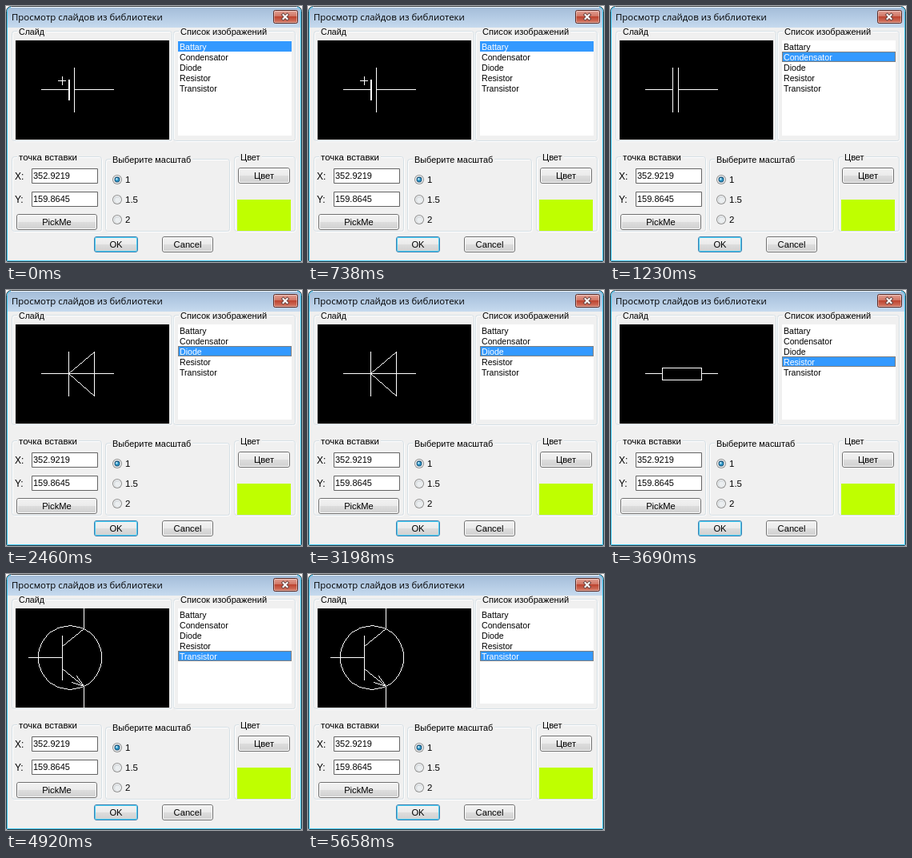
These frames come from a looping animation (370x320 px, 6.15 s). An HTML page with a canvas:

```html
<!DOCTYPE html>
<html lang="ru">
<head>
<meta charset="utf-8">
<style>
html, body { margin: 0; width: 370px; height: 320px; overflow: hidden; background: #fff; }
canvas { display: block; }
</style>
</head>
<body>
<canvas id="stage" width="370" height="320"></canvas>
<script>
const ctx = document.getElementById('stage').getContext('2d');
const SANS = '"Liberation Sans", Arial, sans-serif';
const STEP = 1230;
const items = ['Battary', 'Condensator', 'Diode', 'Resistor', 'Transistor'];

function rect(x, y, w, h, color) {
  ctx.fillStyle = color;
  ctx.fillRect(x, y, w, h);
}

function round(x, y, w, h, r, stroke, fill) {
  ctx.beginPath();
  ctx.roundRect(x + .5, y + .5, w - 1, h - 1, r);
  if (fill) { ctx.fillStyle = fill; ctx.fill(); }
  ctx.lineWidth = 1;
  ctx.strokeStyle = stroke;
  ctx.stroke();
}

function text(str, x, y, size = 11, color = '#000', font = SANS, align = 'left') {
  ctx.font = `${size}px ${font}`;
  ctx.textAlign = align;
  ctx.fillStyle = color;
  ctx.fillText(str, x, y);
}

function shade(y, h, ...stops) {
  const g = ctx.createLinearGradient(0, y, 0, y + h);
  stops.forEach(([at, color]) => g.addColorStop(at, color));
  return g;
}

function group(x, y, w, h, label, tx, size) {
  round(x + 1, y + 1, w, h, 3, '#fff');
  round(x, y, w, h, 3, '#d5dfe5');
  ctx.font = `${size}px ${SANS}`;
  rect(tx - 2, y - 2, ctx.measureText(label).width + 4, 5, '#f0f0f0');
  text(label, tx, y + 5, size);
}

function button(x, y, w, h, label, active) {
  round(x, y, w, h, 2.5, active ? '#3c7fb1' : '#707070',
    shade(y, h, [0, '#f3f3f3'], [.48, '#ebebeb'], [.5, '#dddddd'], [1, '#cfcfcf']));
  round(x + 1, y + 1, w - 2, h - 2, 1.5, active ? '#48d0f5' : '#fafafa');
  text(label, x + w / 2, y + 14, 11.2, '#000', SANS, 'center');
}

function field(y, label, value) {
  text(label, 11, y + 14, 12);
  round(32, y, 83, 19, 0, '#646464', '#fff');
  text(value, 34, y + 13, 11);
}

function disc(x, y, r, color) {
  ctx.fillStyle = color;
  ctx.beginPath();
  ctx.arc(x, y, r, 0, Math.PI * 2);
  ctx.fill();
}

function radio(y, label, on) {
  disc(139, y, 6, '#8e8f8f');
  disc(139, y, 5, '#f6f6f6');
  disc(139, y, 4, '#d3d8dc');
  disc(139.5, y + .5, 3.3, '#ebeef0');
  if (on) {
    disc(139, y, 3.4, '#17486b');
    disc(139, y, 2.6, '#2c93c4');
    disc(138.3, y - .8, 1.2, '#b5e6f7');
  }
  text(label, 149, y + 4, 11.5);
}

function titleBar() {
  round(0, 0, 370, 320, [6, 6, 1, 1], '#3a3f44', '#b9d1ea');
  round(1, 1, 368, 318, [5, 5, 0, 0], '#35c3ee',
    shade(1, 26, [0, '#a3bcd8'], [.5, '#b4cbe4'], [1, '#c6daee']));
  rect(6, 1, 358, 1, '#f4f9fd');
  rect(2, 27, 366, 291, '#f0f0f0');
  text('Просмотр слайдов из библиотеки', 7, 18, 11.45, '#000', '"Open Sans", "Noto Sans", sans-serif');
  round(334, 5, 31, 17, 2, '#5b2a25',
    shade(5, 17, [0, '#e5a79b'], [.46, '#d07564'], [.5, '#bd4430'], [1, '#d6806c']));
  round(335, 6, 29, 15, 1, 'rgba(255,255,255,.4)');
  ctx.lineCap = 'square';
  for (const [w, color] of [[4, '#6d4540'], [2, '#fff']]) {
    ctx.lineWidth = w;
    ctx.strokeStyle = color;
    ctx.beginPath();
    ctx.moveTo(346.5, 11); ctx.lineTo(351.5, 16);
    ctx.moveTo(351.5, 11); ctx.lineTo(346.5, 16);
    ctx.stroke();
  }
  ctx.lineCap = 'butt';
}

// Crisp one-pixel polyline
function line(...p) {
  ctx.fillStyle = '#fff';
  for (let i = 0; i + 3 < p.length; i += 2) {
    const dx = p[i + 2] - p[i], dy = p[i + 3] - p[i + 1];
    const n = Math.max(Math.abs(dx), Math.abs(dy), 1);
    for (let k = 0; k <= n; k++)
      ctx.fillRect(Math.round(p[i] + dx * k / n), Math.round(p[i + 1] + dy * k / n), 1, 1);
  }
}

function ring(cx, cy, r) {
  const p = [];
  for (let i = 0; i <= 48; i++) {
    const a = i * Math.PI / 24;
    p.push(Math.round(cx + r * Math.cos(a)), Math.round(cy + r * Math.sin(a)));
  }
  line(...p);
}

const symbols = [
  () => {
    line(44, 104, 78, 104);
    rect(78, 92, 2, 26, '#fff');
    line(85, 77, 85, 132);
    line(85, 104, 134, 104);
    line(65, 93, 74, 93);
    line(70, 88, 70, 98);
  },
  () => {
    line(44, 104, 78, 104);
    line(78, 77, 78, 132);
    line(85, 77, 85, 132);
    line(85, 104, 134, 104);
  },
  () => {
    line(44, 104, 134, 104);
    line(78, 77, 78, 132);
    line(78, 104, 110, 77, 110, 132, 78, 104);
  },
  () => {
    line(44, 104, 65, 104);
    line(65, 97, 114, 97, 114, 112, 65, 112, 65, 97);
    line(114, 104, 134, 104);
  },
  () => {
    ring(79.6, 104, 39.8);
    line(28, 104, 70, 104);
    line(70, 77, 70, 132);
    line(70, 90, 97, 68, 97, 43);
    line(70, 118, 97, 140, 97, 166);
    line(82, 135, 97, 140, 88, 127);
  }
];

function dotted(x, y, w, h, color) {
  ctx.lineWidth = 1;
  ctx.strokeStyle = color;
  ctx.setLineDash([1, 1]);
  ctx.strokeRect(x + .5, y + .5, w - 1, h - 1);
  ctx.setLineDash([]);
}

function list(sel) {
  rect(215, 43, 142, 119, '#fff');
  const top = 44 + sel * 13;
  rect(215, top, 142, 13, '#3399ff');
  if (sel) dotted(215, top, 142, 13, '#cc6600');
  items.forEach((name, i) =>
    text(name, 217, 55 + i * 13, 10.6, i === sel ? '#fff' : '#000'));
}

function draw(sel) {
  ctx.clearRect(0, 0, 370, 320);
  titleBar();
  group(7, 31, 201, 138, 'Слайд', 16, 10.6);
  group(209, 31, 153, 138, 'Список изображений', 218, 11.1);
  group(7, 188, 113, 94, 'точка вставки', 16, 11.5);
  group(124, 191, 156, 91, 'Выберите масштаб', 133, 10.9);
  group(285, 188, 77, 94, 'Цвет', 293, 11);

  rect(12, 43, 192, 124, '#000');
  symbols[sel]();
  list(sel);

  field(203, 'X:', '352.9219');
  field(232, 'Y:', '159.8645');
  button(13, 260, 101, 20, 'PickMe');
  radio(217, '1', true);
  radio(242, '1.5');
  radio(267, '2');
  button(290, 202, 65, 20, 'Цвет');
  rect(289, 242, 67, 39, '#bfff00');
  button(110, 288, 55, 20, 'OK', true);
  button(195, 288, 64, 20, 'Cancel');
}

const start = performance.now();
let shown = -1;

function tick() {
  const sel = Math.floor((performance.now() - start) / STEP) % items.length;
  if (sel !== shown) draw(shown = sel);
  requestAnimationFrame(tick);
}
tick();
</script>
</body>
</html>
```
